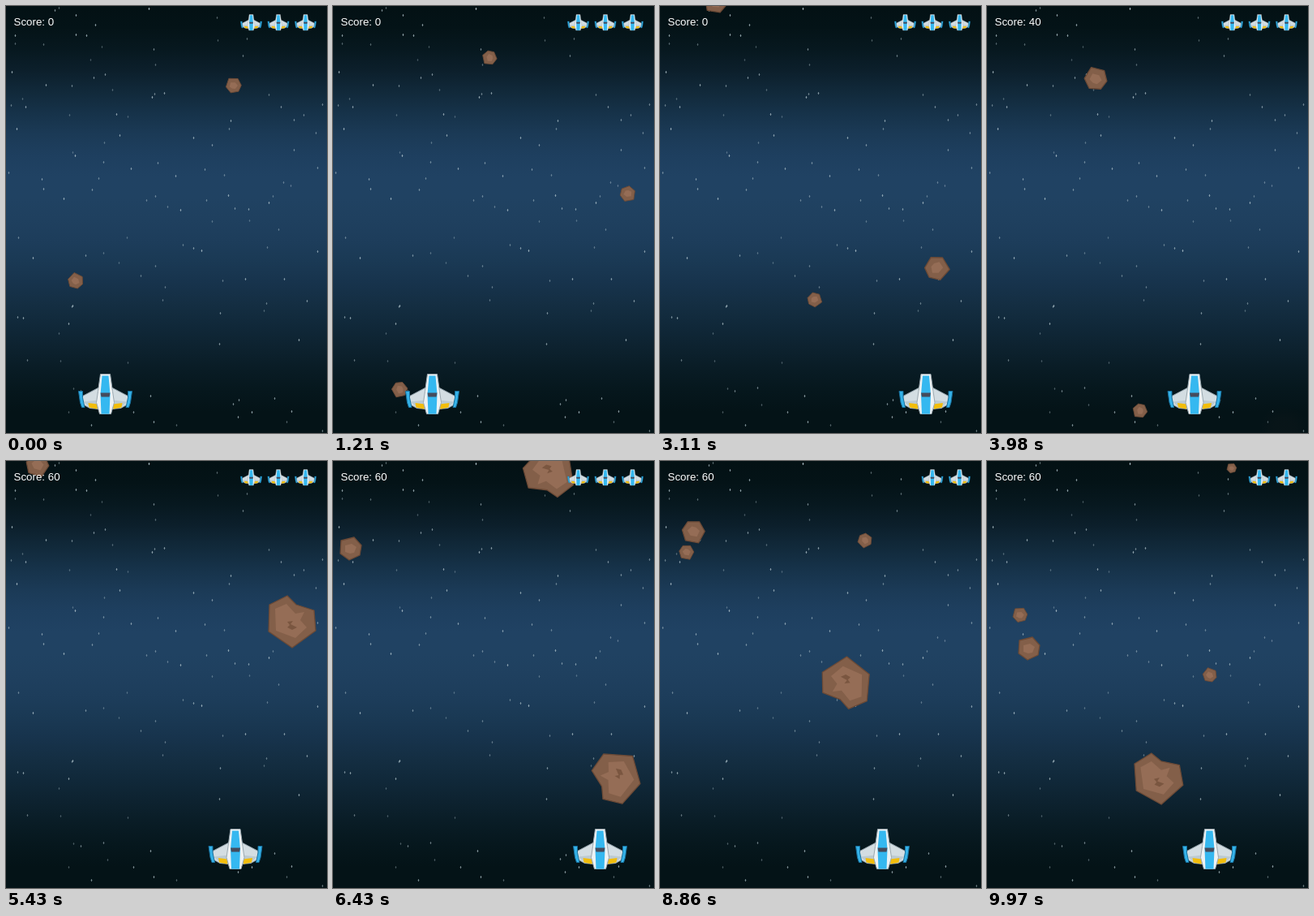
These frames come from a looping animation (396x526 px, 10 s). An HTML page with a canvas:

```html
<!DOCTYPE html>
<html lang="en">
<head>
<meta charset="utf-8">
<title>Asteroid shooter</title>
<style>
html, body { margin: 0; width: 100%; height: 100%; overflow: hidden; background: #041216; }
canvas { position: absolute; left: 0; top: 0; display: block; }
#score {
  position: absolute; left: 9.5px; top: 12px;
  font: 13.33px/16px "Liberation Sans", Arial, sans-serif;
  color: #fff; white-space: pre;
}
</style>
</head>
<body>
<canvas id="stage" width="396" height="526"></canvas>
<div id="score">Score: 0</div>
<script>
const W = 396, H = 526, LOOP = 10;
const SHIP_Y = 478.5, SHIP_SPEED = 150, SHOT_SPEED = 600;
const CRASH = 6.6, RESPAWN = 7.1;
// Moments when the picture stands still while time goes on.
const HOLDS = [[0.12, 0.32], [0.81, 1.21], [6.70, 7.06]];

const ctx = document.getElementById('stage').getContext('2d');
const scoreBox = document.getElementById('score');

function seeded(seed) {
  return () => (seed = seed * 16807 % 2147483647) / 2147483647;
}

const shape = points => {
  const path = new Path2D();
  points.forEach(([x, y]) => path.lineTo(x, y));
  path.closePath();
  return path;
};

function paint(path, fill, stroke, width = 1) {
  ctx.fillStyle = fill;
  ctx.fill(path);
  if (stroke) {
    ctx.strokeStyle = stroke;
    ctx.lineWidth = width;
    ctx.stroke(path);
  }
}

function at(x, y, scale, degrees, draw) {
  ctx.save();
  ctx.translate(x, y);
  ctx.rotate(degrees * Math.PI / 180);
  ctx.scale(scale, scale);
  ctx.lineJoin = 'round';
  draw();
  ctx.restore();
}

// Sky: a blue band that fades to near black along a cosine.
const PEAK = 0.41, EDGE = [3, 17, 20], BAND = [32, 66, 99];
const sky = ctx.createLinearGradient(0, 0, 0, H);
for (let p = 0; p <= 1; p += 0.05) {
  const u = p < PEAK ? p / PEAK : (1 - p) / (1 - PEAK);
  const k = (0.5 - 0.5 * Math.cos(Math.PI * u)) ** (p < PEAK ? 1 : 0.8);
  sky.addColorStop(p, `rgb(${EDGE.map((c, i) => c + (BAND[i] - c) * k)})`);
}

const random = seeded(2024);
const stars = Array.from({ length: 130 }, () => ({
  x: Math.floor(random() * W),
  y: Math.floor(random() * H),
  alpha: 0.25 + 0.4 * random()
}));

function drawSky() {
  ctx.fillStyle = sky;
  ctx.fillRect(0, 0, W, H);
  for (const { x, y, alpha } of stars) {
    ctx.fillStyle = `rgba(190,208,215,${alpha})`;
    ctx.fillRect(x, y - 1, 1, 3);
    ctx.fillStyle = `rgba(190,208,215,${alpha / 3})`;
    ctx.fillRect(x - 1, y, 3, 1);
  }
}

const BIG = {
  hull: shape([[-6,-32], [5,-21], [27,-14], [29,11], [0,32], [-29,12], [-28,-21]]),
  face: shape([[-21,-16], [-7,-22], [4,-10], [15,-12], [10,-2], [18,7], [4,20], [-20,11]]),
  pits: shape([[-6,0], [1,-1], [-2,3], [6,7], [0,10], [-6,7], [-3,4]])
};
const SMALL = {
  hull: shape([[-12,-10], [4,-14], [13,-4], [11,8], [-2,14], [-13,6]]),
  face: shape([[-7,-4], [1,-6], [7,-2], [4,5], [-1,6], [-7,4]])
};

// Each rock drifts and spins steadily through the pose it has at time t.
const rock = (kind, scale, t, x, y, vx, vy, angle, spin, until = LOOP) => ({
  kind, scale, until,
  place: now => [x + vx * (now - t), y + vy * (now - t)],
  turn: now => angle + spin * (now - t)
});

const firstHit = rock(SMALL, 1.05, 2.08, 311, 86, 29, 230, 22, 120, 3.3);
const secondHit = rock(SMALL, 1, 3.98, 134.5, 90, 75, 110, 28, 130, 4.75);
const rocks = [
  rock(SMALL, 0.68, 0, 281, 98, 68, 110, 15, 140),
  rock(SMALL, 0.68, 0, 86, 339, -3, 110, 40, -120),
  rock(SMALL, 0.63, 2.08, 192, 200, -1.6, 157, 25, 130),
  firstHit, secondHit,
  rock(BIG, 1, 5.43, 353, 198, -4, 190, 0, -140, CRASH),
  rock(SMALL, 1, 6.43, 22, 108, -16.5, 103.5, 0, 150),
  rock(BIG, 1, 7.63, 247, 142, -15, 106.5, -6, 154),
  rock(SMALL, 0.65, 7.63, 23, 26, 7.7, 70, 20, 150),
  rock(SMALL, 1, 9.97, 52, 231, 10, 130, 0, 140),
  rock(SMALL, 0.62, 9.97, 275, 264, 20, 150, 35, 140),
  rock(SMALL, 0.43, 9.97, 302, 9, 10, 110, 10, 140)
];

function drawRock({ kind, scale, until, place, turn }, t) {
  if (t >= until) return;
  at(...place(t), scale, turn(t), () => {
    paint(kind.hull, '#835f49', '#6c4a36', 1.3);
    paint(kind.face, '#956d56');
    if (kind.pits) paint(kind.pits, '#7a5640');
  });
}

// The player heads for each x in turn, starting at the given time.
const MOVES = [[0.03, 140], [0.4, 122.5], [1.26, 216], [2.25, 328], [3.3, 256],
  [4, 195], [4.5, 283], [5.6, 329.5], [RESPAWN, 274.5]];

function shipX(t) {
  let x = 122.5;
  for (const [start, goal] of MOVES) {
    const reach = Math.max(0, t - start) * SHIP_SPEED;
    x += Math.max(-reach, Math.min(reach, goal - x));
  }
  return x;
}

const WING = shape([[7,-9], [28,2], [28,12], [19,17], [7,18]]);
const SHADE = shape([[9,7], [27,9], [19,16], [8,17]]);
const FLAP = shape([[9,12], [21,10.5], [20,16], [10,18]]);
const TIP = shape([[28,-4], [33,-4], [31,10], [29,16], [25.5,16], [28,4]]);
const BODY = shape([[-6,-25], [6,-25], [9,-4], [11,10], [7,24], [-7,24], [-11,10], [-9,-4]]);
const STRIPE = shape([[-4,-23], [4,-23], [6,0], [5,24], [-5,24], [-6,0]]);
const CABIN = shape([[-6,-2], [6,-2], [5,3], [-5,3]]);

function drawShip(x, y, scale) {
  at(x, y, scale, 0, () => {
    for (const side of [1, -1]) {
      ctx.save();
      ctx.scale(side, 1);
      paint(WING, '#d3dde2', '#93a2ab');
      paint(SHADE, '#bccad1');
      paint(FLAP, '#f2bd0b');
      paint(TIP, '#35b2e8', '#176f9c');
      ctx.restore();
    }
    paint(BODY, '#edf2f4', '#9ba8af');
    paint(STRIPE, '#35b8f0');
    paint(CABIN, '#454b5c');
  });
}

const BEAM = shape([[-2.5,0], [2.5,0], [3.5,5], [0.8,36], [-0.8,36], [-3.5,5]]);
const CORE = shape([[-1.2,2], [1.2,2], [1.6,6], [0.5,29], [-0.5,29], [-1.6,6]]);
const shots = [
  { from: 1.493 }, { from: 1.893 },
  { from: 3.2, until: firstHit.until }, { from: 4.4, until: secondHit.until }
];

function drawShot({ from, until = LOOP }, t) {
  if (t < from || t >= until) return;
  at(shipX(from), 440 - SHOT_SPEED * (t - from), 1, 0, () => {
    paint(BEAM, '#2a9fd3');
    paint(CORE, '#d5f1fc');
  });
}

const blasts = [
  { start: firstHit.until, life: 0.8, size: 32, place: firstHit.place },
  { start: secondHit.until, life: 0.6, size: 32, place: secondHit.place },
  { start: CRASH, life: 0.9, size: 64, place: () => [shipX(CRASH), SHIP_Y] }
];

function puff(radius, alpha, ...colors) {
  const glow = ctx.createRadialGradient(0, 0, 0, 0, 0, radius);
  colors.forEach((color, i) => glow.addColorStop(i / (colors.length - 1), color));
  ctx.globalAlpha = alpha;
  ctx.fillStyle = glow;
  ctx.fillRect(-radius, -radius, 2 * radius, 2 * radius);
}

function drawBlast({ start, life, size, place }, t) {
  const age = (t - start) / life;
  if (age < 0 || age >= 1) return;
  const radius = size * (0.35 + 0.65 * Math.sqrt(age));
  at(...place(t), 1, 0, () => {
    puff(radius, Math.min(1, 2 - 2 * age),
      'rgba(22,27,29,.85)', 'rgba(22,27,29,.7)', 'rgba(22,27,29,0)');
    puff(radius * 0.9, Math.max(0, 1 - 1.4 * age),
      '#fff6c8', '#ffc247', 'rgba(224,88,20,.8)', 'rgba(120,30,5,0)');
  });
}

function render(seconds) {
  const hold = HOLDS.find(([from, to]) => seconds >= from && seconds < to);
  const t = hold ? hold[0] : seconds;
  drawSky();
  rocks.forEach(r => drawRock(r, t));
  shots.forEach(s => drawShot(s, t));
  if (t < CRASH || t >= RESPAWN) drawShip(shipX(t), SHIP_Y, 1);
  blasts.forEach(b => drawBlast(b, t));
  for (let i = t < CRASH ? 0 : 1; i < 3; i++) drawShip(302.5 + 33.5 * i, 20.5, 0.4);
  const points = t < firstHit.until ? 0 : t < secondHit.until ? 40 : 60;
  scoreBox.textContent = `Score: ${points}`;
}

let origin;
function tick(now) {
  origin ??= now;
  render((now - origin) / 1000 % LOOP);
  requestAnimationFrame(tick);
}
render(0);
requestAnimationFrame(tick);
</script>
</body>
</html>
```
